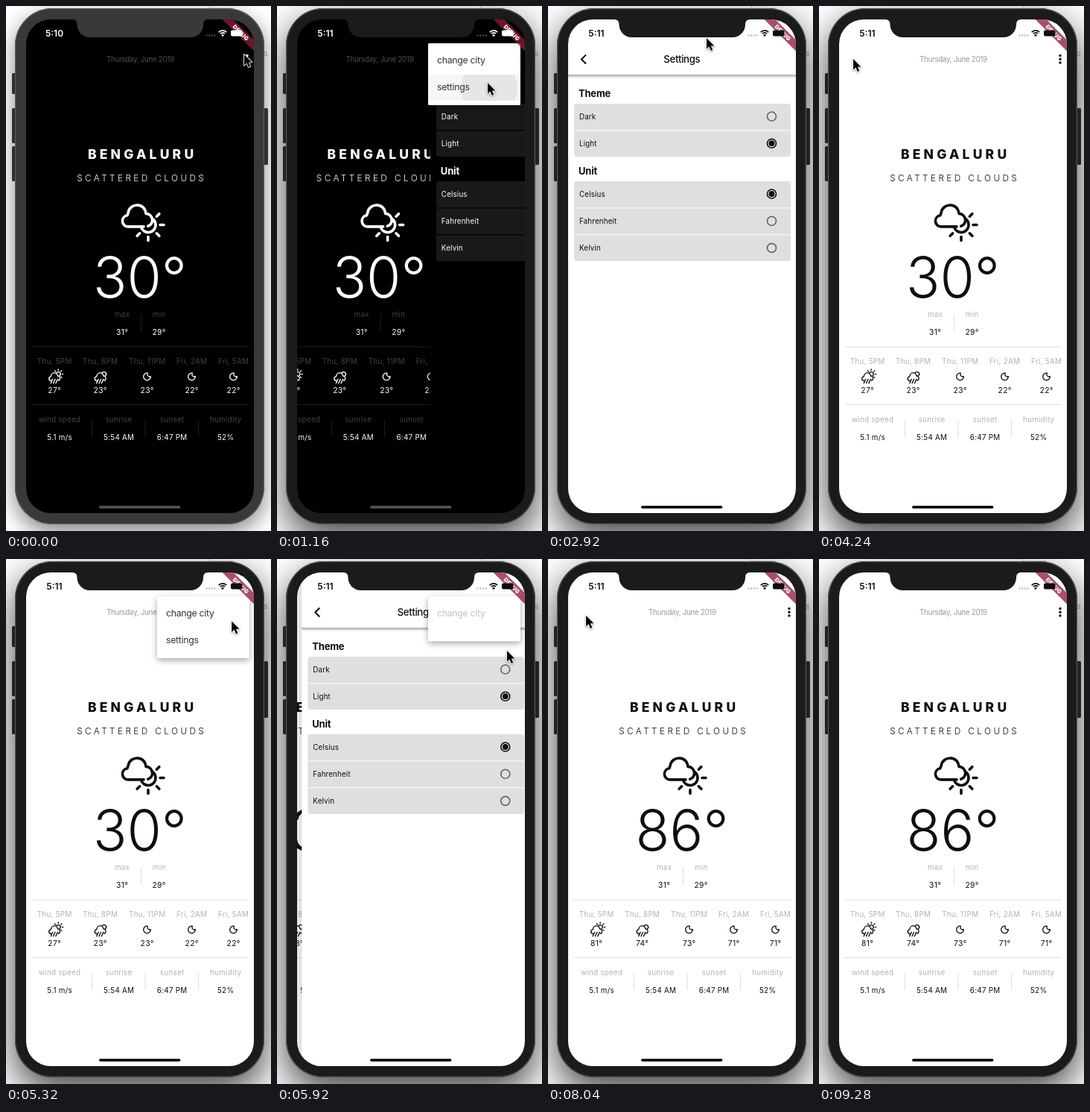
Animation of 356x704 px, one loop 9360 ms. Source, as an HTML page with a canvas:

```html
<!DOCTYPE html>
<html lang="en">
<head>
<meta charset="utf-8">
<title>Weather app</title>
<style>
  html, body { margin: 0; width: 100%; height: 100%; overflow: hidden; background: #fff; }
  canvas { display: block; width: 356px; height: 704px; }
</style>
</head>
<body>
<canvas id="stage"></canvas>
<script>
const LOOP = 9360, W = 356, H = 704;
const SCREEN = { x: 27, y: 18, w: 306, h: 662 };
const canvas = document.getElementById('stage');
const dpr = window.devicePixelRatio || 1;
canvas.width = W * dpr;
canvas.height = H * dpr;
const ctx = canvas.getContext('2d');

// Moments of the interaction, in ms
const PUSH = [1113, 5704], POP = [3640, 7720], OPEN = [330, 4990];
const CLOCK = 80, FOCUS = 280, LIGHT = 2100, FAHRENHEIT = 6560, CURSOR_END = 9240;

// Pointer path: time, x, y
const POINTER = [
  [0, 320, 65], [500, 320, 65], [880, 283, 103], [1590, 283, 103], [1960, 299, 182],
  [2480, 299, 182], [2920, 213, 43], [3270, 46, 71], [4240, 46, 71], [4860, 320, 67],
  [5180, 320, 67], [5480, 283, 103], [5770, 283, 103], [5920, 309, 123], [6380, 299, 286],
  [6840, 299, 286], [7480, 54, 68], [7540, 47, 70], [8000, 47, 70], [8420, 200, 290],
  [8800, 230, 380], [9200, 300, 495]
];

const clamp = v => Math.max(0, Math.min(1, v));
const lerp = (a, b, k) => a + (b - a) * k;
const smooth = k => k * k * (3 - 2 * k);
const span = (t, start, length) => clamp((t - start) / length);

// Fast start, long settling: cubic-bezier(.35, .91, .33, .97)
function settle(x) {
  let lo = 0, hi = 1;
  const bezier = (s, a, b) => 3 * s * (1 - s) ** 2 * a + 3 * s * s * (1 - s) * b + s ** 3;
  for (let i = 0; i < 20; i++) {
    const mid = (lo + hi) / 2;
    if (bezier(mid, .35, .33) < x) lo = mid; else hi = mid;
  }
  return x >= 1 ? 1 : bezier(lo, .91, .97);
}

function pagePosition(t) {
  return PUSH.reduce((sum, start, i) =>
    sum + settle(span(t, start, 300)) - settle(span(t, POP[i], 300)), 0);
}

function menuValue(t) {
  const i = t < OPEN[1] ? 0 : 1;
  return t < PUSH[i] ? span(t, OPEN[i], 300) : clamp((1 - span(t, PUSH[i], 300)) * 1.5);
}

function pointerAt(t) {
  const i = POINTER.findIndex(p => p[0] > t);
  if (i < 0) return POINTER[POINTER.length - 1].slice(1);
  const [t0, x0, y0] = POINTER[i - 1], [t1, x1, y1] = POINTER[i];
  const k = smooth((t - t0) / (t1 - t0));
  return [lerp(x0, x1, k), lerp(y0, y1, k)];
}

// Grey levels as [dark, light] pairs
function makeTheme(k) {
  const grey = (dark, light) => {
    const v = Math.round(lerp(dark, light, k));
    return `rgb(${v},${v},${v})`;
  };
  return {
    light: k, bg: grey(0, 255), fg: grey(255, 14), date: grey(76, 152), label: grey(66, 178),
    line: grey(30, 222), cell: grey(25, 223), split: grey(0, 248), radio: grey(170, 100),
    home: grey(85, 0), signal: grey(70, 190)
  };
}

function text(str, x, y, size, color, { weight = 400, gap = 0, align = 'center' } = {}) {
  ctx.font = `${weight} ${size}px Inter, "Noto Sans", sans-serif`;
  ctx.letterSpacing = gap + 'px';
  ctx.textAlign = align;
  ctx.fillStyle = color;
  ctx.fillText(str, x + (align === 'center' ? gap / 2 : 0), y + size * .36);
}

function box(x, y, w, h, r, color) {
  ctx.fillStyle = color;
  ctx.beginPath();
  ctx.roundRect(x, y, w, h, r);
  ctx.fill();
}

function circle(x, y, r, color) {
  ctx.fillStyle = color;
  ctx.beginPath();
  ctx.arc(x, y, r, 0, 7);
  ctx.fill();
}

function polyline(points, color, width) {
  ctx.strokeStyle = color;
  ctx.lineWidth = width;
  ctx.beginPath();
  points.forEach(([x, y]) => ctx.lineTo(x, y));
  ctx.stroke();
}

function rays(x, y, from, to, angles) {
  for (const deg of angles) {
    const c = Math.cos(deg * Math.PI / 180), s = Math.sin(deg * Math.PI / 180);
    ctx.moveTo(x + c * from, y + s * from);
    ctx.lineTo(x + c * to, y + s * to);
  }
}

function weatherIcon(kind, x, y, scale, color) {
  const PI = Math.PI;
  ctx.save();
  ctx.translate(x, y);
  ctx.scale(scale, scale);
  ctx.strokeStyle = color;
  ctx.lineWidth = 3.6;
  ctx.lineCap = ctx.lineJoin = 'round';
  ctx.beginPath();
  if (kind === 'moon') {
    ctx.arc(0, 0, 13, -.437 * PI, -.026 * PI, true);
    ctx.arc(9, -8, 8, .336 * PI, 1.2 * PI);
    ctx.closePath();
  } else {
    ctx.arc(-12, 7.3, 7.6, .5 * PI, 1.45 * PI);
    ctx.arc(0, -2, 12, 1.05 * PI, 1.9 * PI);
    ctx.arc(12, 6, 8.6, 1.5 * PI, 2.4 * PI);
    if (kind === 'clouds') {
      ctx.moveTo(-12, 14.9);
      ctx.lineTo(9, 14.9);
      ctx.moveTo(20, 4);
      ctx.arc(15, 12.5, 10, -.33 * PI, .85 * PI);
      rays(15, 12.5, 16, 21, [-45, 0, 45, 90, 135]);
    } else {
      for (const dx of [-8, 1, 10]) {
        ctx.moveTo(dx + 2, 9);
        ctx.lineTo(dx - 5, 24);
      }
      ctx.moveTo(8, -14);
      ctx.arc(14, -9, 8, 1.2 * PI, 2.4 * PI);
      if (kind === 'sunrain') rays(14, -9, 14, 18, [-135, -90, -45, 0, 45]);
    }
  }
  ctx.stroke();
  ctx.restore();
}

function drawHome(theme, hot) {
  const { fg, label, line } = theme;
  const spaced = { gap: .3 };
  box(SCREEN.x, SCREEN.y, SCREEN.w, SCREEN.h, 0, theme.bg);
  text('Thursday, June 2019', 180.5, 71, 9.8, theme.date, { gap: -.3 });
  for (const y of [66.5, 71.2, 76]) circle(324, y, 1.7, fg);

  text('BENGALURU', 181, 199, 17.5, fg, { weight: 800, gap: 4.2 });
  text('SCATTERED CLOUDS', 180.5, 231, 11.8, fg, { weight: 300, gap: 3.4 });
  weatherIcon('clouds', 176, 281, 1, fg);
  text(hot ? '86°' : '30°', 180, 363.5, 75, fg, { weight: 300 });

  text('max', 156, 413, 9.8, label, spaced);
  text('min', 205.5, 413, 9.8, label, spaced);
  text('31°', 156, 437, 10.3, fg, spaced);
  text('29°', 205.5, 437, 10.3, fg, spaced);
  box(181, 413, 1, 24, 0, line);
  box(35, 456.5, 291, 1, 0, line);
  box(35, 534, 291, 1, 0, line);

  [
    [65, 'Thu, 5PM', 'sunrain', 27, 81], [126.5, 'Thu, 8PM', 'rain', 23, 74],
    [189.5, 'Thu, 11PM', 'moon', 23, 73], [249.5, 'Fri, 2AM', 'moon', 22, 71],
    [305.5, 'Fri, 5AM', 'moon', 22, 71]
  ].forEach(([x, hour, kind, celsius, fahrenheit]) => {
    text(hour, x, 476, 9.8, label, spaced);
    weatherIcon(kind, x, 497, .37, fg);
    text((hot ? fahrenheit : celsius) + '°', x, 515, 10.3, fg, spaced);
  });

  [
    [72, 'wind speed', '5.1 m/s'], [151.5, 'sunrise', '5:54 AM'],
    [223, 'sunset', '6:47 PM'], [295, 'humidity', '52%']
  ].forEach(([x, name, value]) => {
    text(name, x, 554, 9.8, label, spaced);
    text(value, x, 578, 9.8, fg, spaced);
  });
  for (const x of [115, 186.5, 258]) box(x, 555, 1, 23, 0, line);
}

function drawRadio(y, amount, theme) {
  ctx.strokeStyle = amount > .5 ? theme.fg : theme.radio;
  ctx.lineWidth = 1.6;
  ctx.beginPath();
  ctx.arc(300.5, y, 6, 0, 7);
  ctx.stroke();
  if (amount > 0) circle(300.5, y, 3.9 * amount, theme.fg);
}

function drawGroup(title, top, rows, theme) {
  text(title, 41, top - 14, 13, theme.fg, { weight: 700, gap: -.2, align: 'left' });
  box(35, top, 291, rows.length * 36 - 1, 4, theme.cell);
  rows.forEach(([name, amount], i) => {
    const y = top + 17 + i * 36.2;
    if (i) box(35, top + i * 35.8 - .5, 291, 1.2, 0, theme.split);
    text(name, 42, y, 9.8, theme.fg, { gap: .15, align: 'left' });
    drawRadio(y, amount, theme);
  });
}

function drawSettings(theme, light, hot) {
  box(SCREEN.x, SCREEN.y, SCREEN.w, SCREEN.h, 0, theme.bg);
  const shade = ctx.createLinearGradient(0, 92, 0, 97);
  shade.addColorStop(0, `rgba(0,0,0,${.34 * theme.light})`);
  shade.addColorStop(1, 'rgba(0,0,0,0)');
  box(SCREEN.x, 92, SCREEN.w, 5, 0, shade);
  ctx.lineCap = 'butt';
  ctx.lineJoin = 'miter';
  polyline([[51, 65.5], [45, 71.5], [51, 77.5]], theme.fg, 2.1);
  text('Settings', 180, 71.5, 13.3, theme.fg, { weight: 500, gap: -.4 });
  drawGroup('Theme', 131, [['Dark', 1 - light], ['Light', light]], theme);
  drawGroup('Unit', 235, [['Celsius', 1 - hot], ['Fahrenheit', hot], ['Kelvin', 0]], theme);
}

// The panel unrolls downwards while its items fade in one after the other
function drawMenu(v, splash) {
  if (v <= 0) return;
  const unit = 1 / 3.5;
  const w = 124 * clamp(v / unit), h = 83 * clamp(v / (2 * unit)), x = 327 - w;
  ctx.save();
  ctx.globalAlpha = clamp(v * 3);
  ctx.shadowColor = 'rgba(0,0,0,.35)';
  ctx.shadowBlur = 9 * dpr;
  ctx.shadowOffsetY = 3 * dpr;
  box(x, 50, w, h, 1.5, '#fff');
  ctx.shadowColor = 'transparent';
  ctx.beginPath();
  ctx.rect(x, 50, w, h);
  ctx.clip();
  const alpha = ctx.globalAlpha;
  if (splash > 0 && v > .95) {
    ctx.save();
    ctx.beginPath();
    ctx.rect(x, 92, w, 35);
    ctx.clip();
    box(x, 92, w, 35, 0, 'rgba(0,0,0,.03)');
    circle(285, 110, 46 * splash, 'rgba(0,0,0,.07)');
    ctx.restore();
  }
  ['change city', 'settings'].forEach((item, i) => {
    ctx.globalAlpha = alpha * clamp((v - (i + 1) * unit) / (1.5 * unit));
    text(item, x + 12, 73 + i * 35.5, 12.3, '#333', { gap: -.3, align: 'left' });
  });
  ctx.restore();
}

function drawBanner() {
  ctx.save();
  ctx.translate(333, 18);
  ctx.rotate(Math.PI / 4);
  box(-45, 19.5, 90, 10.5, 0, 'rgba(143,26,57,.77)');
  text('DEBUG', 0, 25, 7.6, '#fff', { weight: 900 });
  ctx.restore();
}

function drawStatus(theme, t) {
  text(t < CLOCK ? '5:10' : '5:11', 65, 37, 12, theme.fg, { weight: 600 });
  for (let i = 0; i < 4; i++) circle(269.5 + i * 3.7, 39.5, 1.2, theme.signal);
  ctx.strokeStyle = theme.fg;
  ctx.lineCap = 'butt';
  ctx.lineWidth = 1.7;
  for (const r of [4.2, 7.2]) {
    ctx.beginPath();
    ctx.arc(291, 40, r, -.76 * Math.PI, -.24 * Math.PI);
    ctx.stroke();
  }
  circle(291, 39.2, 1.5, theme.fg);
  box(302, 32.5, 15.5, 8, 2, theme.fg);
  box(125, 670.2, 109.5, 3.6, 1.8, theme.home);
}

function drawPhone(focused) {
  const body = focused ? '#1b1b1b' : '#393939', side = focused ? '#222' : '#303030';
  ctx.fillStyle = '#fff';
  ctx.fillRect(0, 0, W, H);
  polyline([[273.5, 0], [273.5, 3], [306, 3]], '#ccc', 1);
  text('s', 349, 63, 10, '#aaa');
  ctx.save();
  ctx.shadowColor = `rgba(0,0,0,${focused ? .74 : .48})`;
  ctx.shadowBlur = (focused ? 50 : 28) * dpr;
  ctx.shadowOffsetY = (focused ? 19 : 10) * dpr;
  box(12, 3, 335, 692, 50, body);
  ctx.restore();
  for (const [x, y, h] of [[8, 90, 28], [8, 137, 47], [8, 188, 47], [346, 137, 76]])
    box(x, y, 6, h, 1.5, side);
  box(12, 3, 335, 692, 50, focused ? '#555' : '#5c5c5c');
  box(13.2, 4.2, 332.6, 689.6, 49, body);
  return body;
}

function drawNotch(color) {
  ctx.fillStyle = color;
  ctx.beginPath();
  ctx.moveTo(89, 17);
  ctx.lineTo(89, 18);
  ctx.quadraticCurveTo(95.5, 18, 95.5, 25);
  ctx.arcTo(95.5, 42, 113, 42, 17);
  ctx.arcTo(265, 42, 265, 25, 17);
  ctx.lineTo(265, 25);
  ctx.quadraticCurveTo(265, 18, 271.5, 18);
  ctx.lineTo(271.5, 17);
  ctx.fill();
}

function drawPointer([x, y]) {
  ctx.save();
  ctx.translate(x, y);
  ctx.beginPath();
  [[0, 0], [0, 14.5], [3.4, 11.4], [5.8, 17], [8.3, 16], [5.9, 10.6], [10.4, 10.4]]
    .forEach(([px, py]) => ctx.lineTo(px, py));
  ctx.closePath();
  ctx.lineJoin = 'round';
  ctx.lineWidth = 1.8;
  ctx.strokeStyle = '#fff';
  ctx.shadowColor = 'rgba(0,0,0,.4)';
  ctx.shadowBlur = 3 * dpr;
  ctx.shadowOffsetY = dpr;
  ctx.stroke();
  ctx.shadowColor = 'transparent';
  ctx.fillStyle = '#000';
  ctx.fill();
  ctx.restore();
}

function draw(t) {
  const page = pagePosition(t);
  const light = span(t, LIGHT, 200), hot = span(t, FAHRENHEIT, 160);
  const theme = makeTheme(light);
  ctx.setTransform(dpr, 0, 0, dpr, 0, 0);
  const body = drawPhone(t >= FOCUS);

  ctx.save();
  ctx.beginPath();
  ctx.roundRect(SCREEN.x, SCREEN.y, SCREEN.w, SCREEN.h, 33);
  ctx.clip();
  if (page < .999) {
    ctx.save();
    ctx.translate(-SCREEN.w / 3 * page, 0);
    drawHome(theme, hot > 0);
    ctx.restore();
  }
  if (page > .001) {
    const shift = SCREEN.w * (1 - page);
    ctx.save();
    ctx.translate(page > .999 ? 0 : shift, 0);
    const edge = ctx.createLinearGradient(12, 0, 27, 0);
    edge.addColorStop(0, 'rgba(0,0,0,0)');
    edge.addColorStop(1, 'rgba(0,0,0,.13)');
    box(12, SCREEN.y, 15, SCREEN.h, 0, edge);
    drawSettings(theme, light, hot);
    ctx.restore();
  }
  const press = t < OPEN[1] ? PUSH[0] : PUSH[1];
  drawMenu(menuValue(t), span(t, press - 60, 130));
  drawBanner();
  drawStatus(theme, t);
  ctx.restore();

  drawNotch(body);
  if (t < CURSOR_END) drawPointer(pointerAt(t));
}

const begin = performance.now();
function tick() {
  draw((performance.now() - begin) % LOOP);
  requestAnimationFrame(tick);
}
tick();
</script>
</body>
</html>
```
